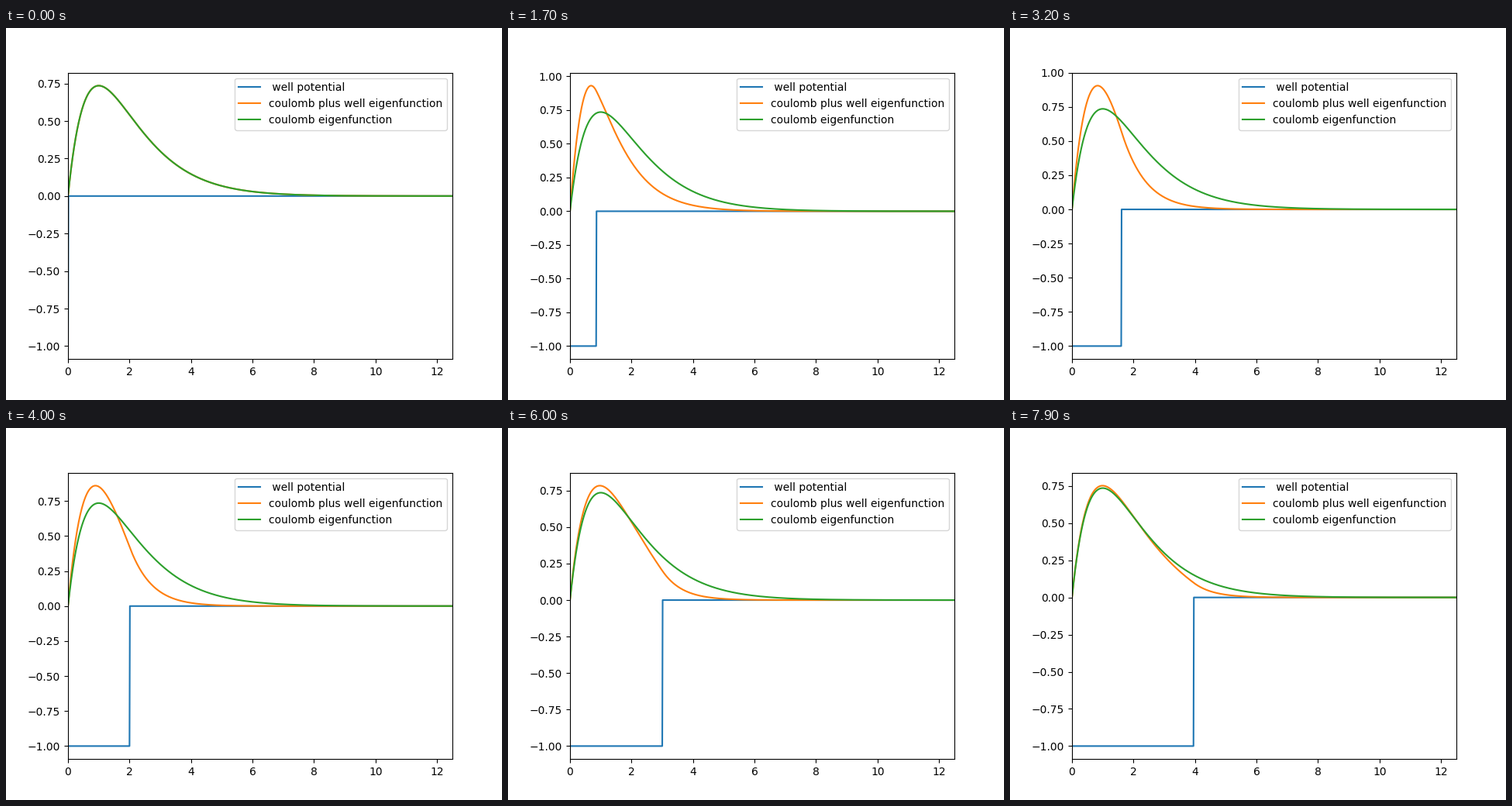
Recreate the animation shown at these times as a matplotlib script. Size 640 px wide and 480 px high, loop 8000 ms.

```python
import numpy as np
import matplotlib.pyplot as plt
from matplotlib.animation import FuncAnimation

FRAMES = 80
STEP = 0.05          # growth of the well per frame
R_MAX, N = 12.5, 1000

r = np.linspace(0, R_MAX, N + 1)
h = r[1]
widths = STEP * np.arange(FRAMES)
wells = np.where(r[:, None] <= widths + 1e-9, -1.0, 0.0)


def shoot(energy):
    """Integrate -u''/2 + (well - 1/r) u = E u outwards, all widths at once."""
    u = np.zeros((N + 1, FRAMES))
    u[1] = h
    factor = 2 + 2 * h**2 * (wells[1:] - 1 / r[1:, None] - energy)
    for i in range(1, N):
        u[i + 1] = factor[i - 1] * u[i] - u[i - 1]
    return u


def ground_states():
    low, high = np.full(FRAMES, -2.0), np.zeros(FRAMES)
    for _ in range(54):
        mid = (low + high) / 2
        has_node = (shoot(mid) < 0).any(axis=0)
        high = np.where(has_node, mid, high)
        low = np.where(has_node, low, mid)
    u = shoot((low + high) / 2)
    return u / np.sqrt((u**2).sum(axis=0) * h)


states = ground_states()
coulomb = 2 * r * np.exp(-r)

fig, ax = plt.subplots(figsize=(6.4, 4.8), dpi=100)
well_line, = ax.plot(r, wells[:, 0], label=" well potential")
state_line, = ax.plot(r, states[:, 0], label="coulomb plus well eigenfunction")
ax.plot(r, coulomb, label="coulomb eigenfunction")
ax.set_xlim(0, R_MAX)
ax.legend(loc="upper right")


def update(k):
    well_line.set_ydata(wells[:, k])
    state_line.set_ydata(states[:, k])
    top = max(states[:, k].max(), coulomb.max())
    margin = 0.05 * (top + 1)
    ax.set_ylim(-1 - margin, top + margin)
    return well_line, state_line


anim = FuncAnimation(fig, update, frames=FRAMES, interval=100,
                     repeat=True, repeat_delay=0, blit=False)
plt.show()
```
